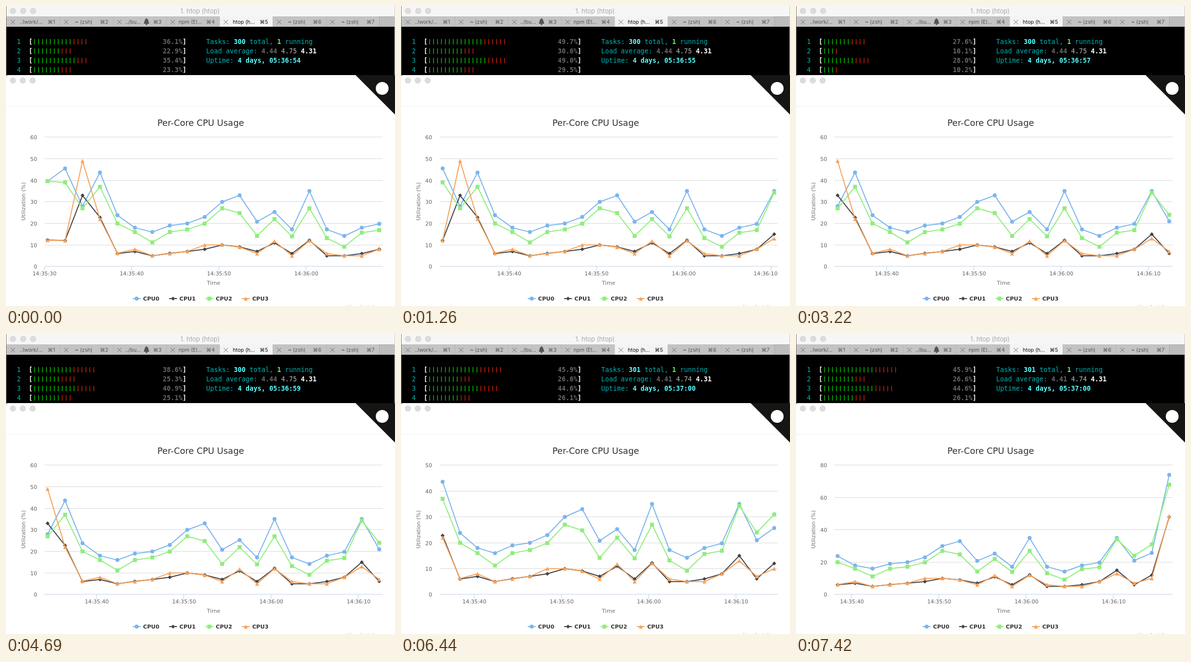
Write an HTML page with a canvas that moves like this. It is 789 px wide and 608 px high and loops after 8000 ms.

```html
<!DOCTYPE html>
<html lang="en">
<head>
<meta charset="utf-8">
<title>Per-Core CPU Usage</title>
<style>
  html, body { margin: 0; width: 100%; height: 100%; overflow: hidden; background: #fff; }
  canvas { display: block; width: 789px; height: 608px; }
</style>
</head>
<body>
<canvas id="stage" width="789" height="608"></canvas>
<script>
const ctx = document.getElementById('stage').getContext('2d');
const LOOP = 8000, TICK = 70;
const UI = 'Inter, "DejaVu Sans", sans-serif';
const CHART = '"DejaVu Sans", sans-serif';
const MONO = '"DejaVu Sans Mono", monospace';

const lerp = (a, b, p) => a + (b - a) * p;
const clamp = (v, lo, hi) => Math.min(hi, Math.max(lo, v));

function rect(x, y, w, h, color) {
  ctx.fillStyle = color;
  ctx.fillRect(x, y, w, h);
}

function line(points, color, width = 1) {
  ctx.beginPath();
  points.forEach(([x, y]) => ctx.lineTo(x, y));
  ctx.strokeStyle = color;
  ctx.lineWidth = width;
  ctx.lineJoin = 'round';
  ctx.stroke();
}

function polygon(points, color) {
  ctx.beginPath();
  points.forEach(([x, y]) => ctx.lineTo(x, y));
  ctx.fillStyle = color;
  ctx.fill();
}

function disc(x, y, r, color) {
  ctx.beginPath();
  ctx.arc(x, y, r, 0, 7);
  ctx.fillStyle = color;
  ctx.fill();
}

function text(str, x, y, font, color, align = 'left') {
  ctx.font = font;
  ctx.fillStyle = color;
  ctx.textAlign = align;
  ctx.fillText(str, x, y);
}

function windowButtons(xs, y) {
  for (const x of xs) {
    disc(x, y, 6, '#cdcdcd');
    disc(x, y, 5.2, '#dcdcdc');
  }
}

// ---------- terminal ----------

// Each meter is "green bars, red bars, percentage".
const readings = [
  { at: 0, meters: ['10 4 36.1', '7 3 22.9', '11 3 35.4', '7 3 23.3'], clock: '05:36:54' },
  { at: 1260, meters: ['14 6 49.7', '9 3 30.6', '15 5 49.0', '9 3 29.5'], clock: '05:36:55' },
  { at: 3010, meters: ['7 4 27.6', '3 1 10.1', '8 4 28.0', '3 1 10.2'], clock: '05:36:57' },
  { at: 4690, meters: ['10 6 38.6', '7 4 25.3', '11 5 40.9', '7 3 25.1'], clock: '05:36:59' },
  { at: 6440, meters: ['13 6 45.9', '8 3 26.6', '13 5 44.6', '8 3 26.1'], clock: '05:37:00',
    tasks: '301', load: ['4.41', '4.74'] }
];

const CYAN = '#00b3b3', BRIGHT = '#5ff', DIM = '#686868';

// Alternating text and colour; a leading "*" on the colour means bold.
function cells(x, y, ...runs) {
  for (let i = 0; i < runs.length; i += 2) {
    const bold = runs[i + 1][0] === '*';
    text(runs[i], x, y, `${bold ? 'bold ' : ''}13.28px ${MONO}`, runs[i + 1].slice(bold ? 1 : 0));
    x += runs[i].length * 8;
  }
}

const tabs = [
  ['..lwork/...', 28], ['~ (zsh)', 140], ['../bu...', 242], ['npm (El...', 350],
  ['htop (h...', 460], ['~ (zsh)', 572], ['~ (zsh)', 680]
];

function drawBell(x, y) {
  ctx.fillStyle = '#555';
  ctx.beginPath();
  ctx.arc(x, y - 2, 3.8, Math.PI, 0);
  ctx.lineTo(x + 5.5, y + 4);
  ctx.lineTo(x - 5.5, y + 4);
  ctx.fill();
  disc(x, y + 5, 1.8, '#555');
  disc(x, y - 6, 1.2, '#555');
}

function drawTerminalFrame() {
  rect(0, 0, 1, 145, '#8b7a68');
  rect(788, 0, 1, 145, '#d2cbc3');
  rect(1, 0, 787, 21, '#f6f6f6');
  windowButtons([14, 35, 55], 10);
  text('1. htop (htop)', 393.5, 15, `12.9px ${UI}`, '#a8a8a8', 'center');

  rect(1, 21, 787, 21, '#bdbdbd');
  rect(1, 21, 787, 1, '#b0b0b0');
  tabs.forEach(([label, x], i) => {
    const left = 1.5 + i * 108, active = i === 4;
    rect(left, 21, 108, 21, active ? '#f4f4f4' : '#c3c3c3');
    line([[left + 108, 21], [left + 108, 42]], '#a6a6a6');
    const color = active ? '#111' : '#555';
    line([[left + 8, 28], [left + 17, 37]], '#666');
    line([[left + 17, 28], [left + 8, 37]], '#666');
    text(label, x, 36, `10.6px ${UI}`, color);
    text('⌘' + (i + 1), left + 98, 36, `10.6px ${UI}`, color, 'right');
  });
  drawBell(285, 32);
  rect(1, 42, 787, 103, '#000');
}

function drawReading({ meters, clock, tasks = '300', load = ['4.44', '4.75'] }) {
  meters.forEach((meter, row) => {
    const [green, red, percent] = meter.split(' ');
    const y = 77 + row * 19;
    cells(22, y, String(row + 1), CYAN, '  ', CYAN, '[', '*#fff');
    for (let i = 0; i < +green + +red; i++) {
      rect(57.2 + i * 8, y - 10, 1.6, 11, i < green ? '#00b400' : '#bb1c08');
    }
    cells(318, y, percent + '%', '*' + DIM, ']', '*#fff');
  });
  cells(406, 77, 'Tasks: ', CYAN, tasks, '*' + BRIGHT, ' total, ', CYAN,
    '1', '*#5f5', ' running', CYAN);
  cells(406, 96, 'Load average: ', CYAN, load[0] + ' ', '*' + DIM, load[1] + ' ', '#bbb',
    '4.31', '*#fff');
  cells(406, 115, 'Uptime: ', CYAN, '4 days, ' + clock, '*' + BRIGHT);
}

// ---------- chart ----------

const LEFT = 78, RIGHT = 764, TOP = 265.9, BOTTOM = 528;
const LAST = 19, FIRST_X = 84.4, GAP = 35.4;
const SLIDE = 500, slideStarts = [599, 2703, 4807, 6932];
const axes = [[60, 10], [60, 10], [60, 10], [50, 10], [80, 20]];

const series = [
  { name: 'CPU0', color: '#7cb5ec', shape: 'circle', data: [39.6, 45.5, 28, 43.6, 23.8, 18, 16, 19, 20,
    23, 30, 33, 20.8, 25.3, 17.2, 35, 17.2, 14.2, 18, 19.8, 35, 21, 25.7, 74] },
  { name: 'CPU1', color: '#434348', shape: 'diamond', data: [12.3, 12.1, 33, 22.8, 6, 7, 5, 6.1, 7,
    8, 10, 9.1, 7, 11, 6, 12.2, 5, 5, 6, 8, 15, 6.1, 12, 48] },
  { name: 'CPU2', color: '#90ed7d', shape: 'square', data: [39.6, 39, 27, 37, 20, 16, 11.2, 16, 17.2,
    19.9, 27, 24.8, 14.2, 22, 14, 27, 13.2, 9.2, 15.7, 16.9, 34.3, 24, 31, 68] },
  { name: 'CPU3', color: '#f7a35c', shape: 'triangle', data: [12.2, 12, 49, 22, 6.2, 8, 5, 6, 7,
    10, 10, 9, 6, 11.8, 5, 12, 6, 5, 5, 8, 13, 7, 10, 48.5] }
];

const valueY = (v, state) => BOTTOM - v * (BOTTOM - TOP) / axes[state][0];
const timeX = (seconds, state) => 77.5 + seconds * 17.7 - state * GAP;
const inView = x => x >= LEFT - 1 && x <= RIGHT;
const crisp = v => Math.floor(v) + 0.5;

function drawMarker(shape, x, y, color) {
  if (shape === 'circle') disc(x, y, 4, color);
  else if (shape === 'square') rect(x - 4, y - 4, 8, 8, color);
  else if (shape === 'diamond') polygon([[x, y - 4], [x + 4, y], [x, y + 4], [x - 4, y]], color);
  else polygon([[x, y - 4], [x + 4, y + 4], [x - 4, y + 4]], color);
}

// Ticks that leave fade out, ticks that arrive fade in.
function tickAlpha(before, after, p) {
  if (before && after) return 1;
  return before ? 1 - p : after ? lerp(0.1, 1, p) : 0;
}

function drawValueAxis(a, b, p) {
  const has = (v, s) => v <= axes[s][0] && v % axes[s][1] === 0;
  for (let v = 0; v <= 80; v += 10) {
    ctx.globalAlpha = tickAlpha(has(v, a), has(v, b), p);
    if (!ctx.globalAlpha) continue;
    const from = valueY(v, a), to = valueY(v, b);
    if (v) {
      const y = crisp(lerp(Math.max(TOP, from), Math.max(TOP, to), p));
      line([[LEFT, y], [RIGHT, y]], '#d8d8d8');
    }
    text(v, 63, lerp(from, to, p) + 4.4, `10.8px ${CHART}`, '#606060', 'right');
  }
  ctx.globalAlpha = 1;
}

function drawTimeAxis(a, b, p) {
  line([[LEFT, BOTTOM - 0.5], [RIGHT, BOTTOM - 0.5]], '#c0d0e0');
  for (let s = 0; s <= 50; s += 10) {
    const from = timeX(s, a), to = timeX(s, b);
    ctx.globalAlpha = tickAlpha(inView(from), inView(to), p);
    if (!ctx.globalAlpha) continue;
    const x = crisp(lerp(from, to, p));
    line([[x, 528], [x, 537]], '#c0d0e0');
    const labelX = pos => inView(pos) ? Math.min(pos + 0.5, RIGHT - 24.5) : pos;
    const clock = s < 30 ? `14:35:${30 + s}` : `14:36:${String(s - 30).padStart(2, '0')}`;
    text(clock, lerp(labelX(from), labelX(to), p), 546, `10.8px ${CHART}`, '#606060', 'center');
  }
  ctx.globalAlpha = 1;
}

function drawSeries({ data, color, shape }, a, b, p) {
  const at = (i, s) => [FIRST_X + (i - s) * GAP, valueY(data[i], s)];
  const between = (from, to) => [lerp(from[0], to[0], p), lerp(from[1], to[1], p)];
  const inner = [];
  for (let i = a + 1; i <= a + LAST; i++) inner.push(between(at(i, a), at(i, b)));
  const start = between(at(a, a), at(b, b));
  const end = between(at(a + LAST, a), at(b + LAST, b));
  line([start, ...inner, end], color, 2);

  const markers = [...inner, at(b + LAST, b)];
  if (a === b) markers.unshift(start);
  markers.forEach(([x, y]) => drawMarker(shape, x, y, color));
}

function drawLegend() {
  series.forEach(({ name, color, shape }, i) => {
    const x = 265 + i * 73.8;
    line([[x - 8, 593], [x + 8, 593]], color, 2);
    drawMarker(shape, x, 593, color);
    text(name, x + 13, 597, `bold 11.1px ${CHART}`, '#333');
  });
}

function drawChart(time) {
  const b = slideStarts.filter(start => start <= time).length;
  const a = Math.max(0, b - 1);
  const x = b ? clamp((time - slideStarts[a]) / SLIDE, 0, 1) : 1;
  let p = (1 - Math.cos(Math.PI * x)) / 2;
  if (p > 0.99) p = 1;

  ctx.save();
  ctx.beginPath();
  ctx.rect(15, 219, 759, 389);
  ctx.clip();
  drawValueAxis(a, b, p);
  drawTimeAxis(a, b, p);
  series.forEach(item => drawSeries(item, a, b, p));
  text('Per-Core CPU Usage', 395, 243, `17.6px ${CHART}`, '#333', 'center');
  text('Time', 421, 565, `11.2px ${CHART}`, '#707070', 'center');
  ctx.save();
  ctx.translate(39, 396);
  ctx.rotate(-Math.PI / 2);
  text('Utilization (%)', 0, 0, `11px ${CHART}`, '#707070', 'center');
  ctx.restore();
  drawLegend();
  text('Line chart demo', 764, 613, `8.6px ${CHART}`, '#909090', 'right');
  ctx.restore();
}

function drawBrowserFrame() {
  ctx.beginPath();
  ctx.roundRect(0, 140, 789, 480, 4);
  ctx.fillStyle = '#fff';
  ctx.fill();
  windowButtons([14, 34, 54], 151);
  rect(0, 203, 789, 1, '#efefef');
  polygon([[709, 140], [789, 140], [789, 220]], '#151513');
  disc(763, 167, 13, '#fff');
}

function draw(now) {
  const time = Math.floor(now % LOOP / TICK) * TICK;
  drawTerminalFrame();
  drawReading(readings.filter(r => r.at <= time).pop());
  drawBrowserFrame();
  drawChart(time);
}

let began;
function frame(now) {
  began ??= now;
  draw(now - began);
  requestAnimationFrame(frame);
}
requestAnimationFrame(frame);
</script>
</body>
</html>
```
